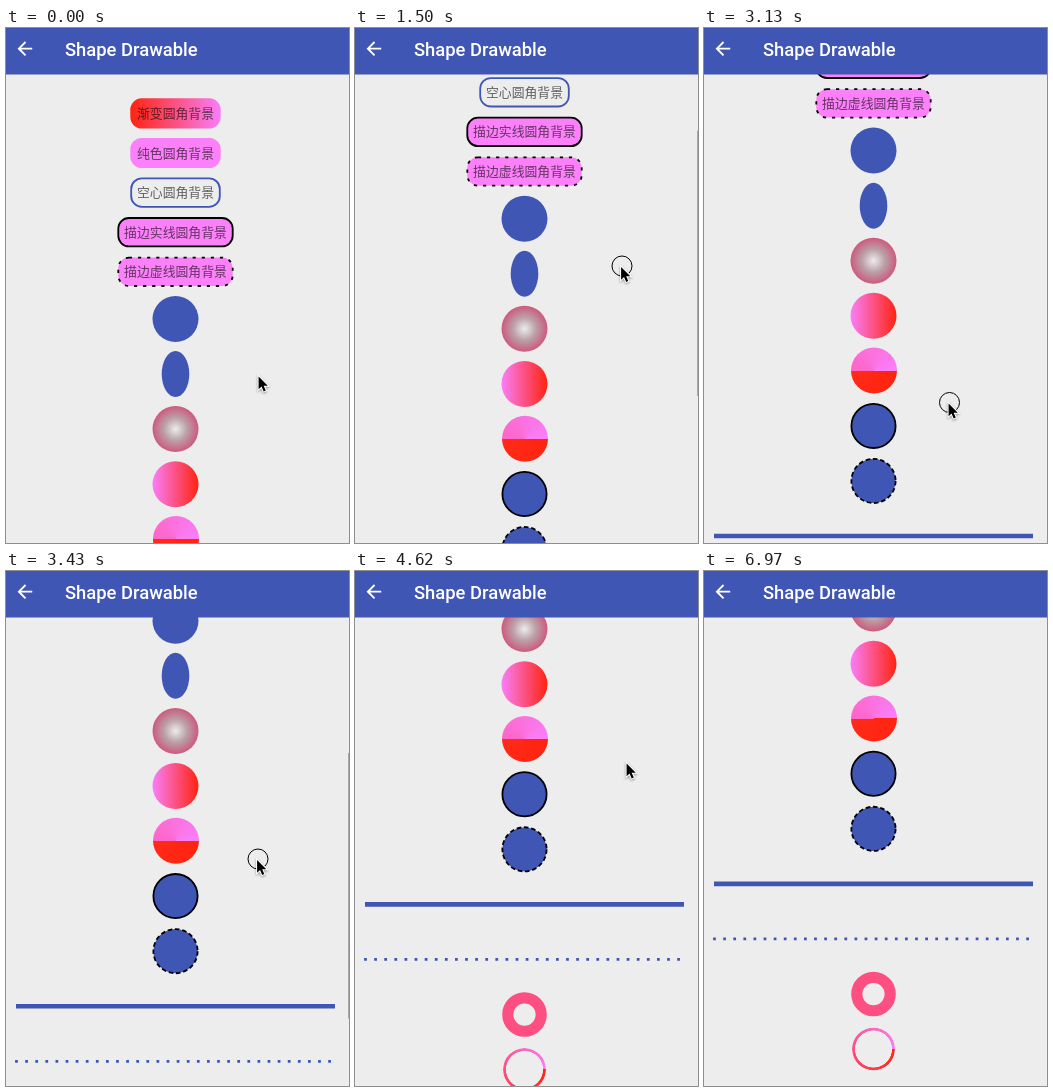
Write an HTML page that moves like this. It is 343 px wide and 515 px high and loops after 7.27 s.

```html
<!DOCTYPE html>
<html lang="zh">
<head>
<meta charset="utf-8">
<title>Shape Drawable</title>
<style>
html, body { margin: 0; width: 100%; height: 100%; overflow: hidden; background: #ededed; }
#stage { position: relative; width: 100%; height: 100%; overflow: hidden; contain: strict; }
#list, svg { position: absolute; left: 0; top: 0; }
.sweep { position: absolute; border-radius: 50%; }
#half {
  left: 146.5px; top: 488.2px; width: 46px; height: 46px;
  background: conic-gradient(from 90deg, #ff2410, #ff2a18 50%, #fd66c8 50%, #f97ef8);
}
#arc {
  left: 148px; top: 820.1px; width: 43px; height: 43px;
  background: conic-gradient(from 90deg, #ff2410, #fe4f83 50%, #f97ef8);
  -webkit-mask: radial-gradient(circle, transparent 18.2px, #000 18.8px);
  mask: radial-gradient(circle, transparent 18.2px, #000 18.8px);
}
.label { font: 12.85px "Noto Sans CJK SC", "Noto Sans CJK", sans-serif; fill: #000; fill-opacity: .6; text-anchor: middle; }
.title { font: 500 18.4px Roboto, sans-serif; fill: #fff; }
#arrow { stroke: #fff; stroke-width: 2.2; paint-order: stroke; filter: drop-shadow(0 1px 1px #0006); }
</style>
</head>
<body>
<div id="stage">
  <div id="list">
    <svg width="343" height="900">
      <defs>
        <linearGradient id="warm"><stop stop-color="#ff2410"/><stop offset="1" stop-color="#f97ef8"/></linearGradient>
        <linearGradient id="cool"><stop stop-color="#f97ef8"/><stop offset="1" stop-color="#ff2410"/></linearGradient>
        <radialGradient id="glow"><stop stop-color="#ececec"/><stop offset=".5" stop-color="#bba0a8"/><stop offset="1" stop-color="#cc5a7e"/></radialGradient>
      </defs>
      <g id="shapes"></g>
    </svg>
    <div id="half" class="sweep"></div>
    <div id="arc" class="sweep"></div>
  </div>
  <svg width="343" height="515">
    <rect id="bar" x="342" width="1" height="265.5" fill="#a9a9a9"/>
    <rect width="343" height="46.5" fill="#4056b4"/>
    <path transform="translate(7.9 9.7) scale(.917)" fill="#fff" d="M20 11H7.83l5.59-5.59L12 4l-8 8 8 8 1.41-1.41L7.83 13H20z"/>
    <text class="title" x="58.9" y="27.7">Shape Drawable</text>
    <g id="cursor">
      <circle id="ring" cx="1.5" cy=".5" r="10" fill="none" stroke="#000"/>
      <path id="arrow" transform="translate(.6 1.4) scale(.92)" d="M0 0V14l3.2-3 2.3 5.3 2.3-1-2.3-5.1H10z"/>
    </g>
  </svg>
</div>
<script>
const $ = id => document.getElementById(id);
const BLUE = '#4056b4', PINK = '#fb80f9', CX = 169.5;
const rowY = k => 291 + 55.06 * k;

function pill(row, text, fill, stroke = 'none', dash = '') {
  const inset = stroke === 'none' ? 0 : 0.9;
  const w = 13 + 12.9 * text.length - 2 * inset, h = 30.2 - 2 * inset, y = 85.4 + 39.6 * row;
  return `<rect x="${CX - w / 2}" y="${y - h / 2}" width="${w}" height="${h}" rx="${11.5 - inset}"
    fill="${fill}" stroke="${stroke}" stroke-width="1.8" stroke-dasharray="${dash}"/>
    <text class="label" x="${CX}" y="${y + 4.6}">${text}</text>`;
}
const oval = (k, fill, rx = 23, r = 23, extra = '') =>
  `<ellipse cx="${CX}" cy="${rowY(k)}" rx="${rx}" ry="${r}" fill="${fill}" ${extra}/>`;
const line = (k, x1, x2, w, dash = '') =>
  `<path d="M${x1} ${rowY(k)}H${x2}" stroke="${BLUE}" stroke-width="${w}" stroke-dasharray="${dash}"/>`;
const outline = 'stroke="#000" stroke-width="1.8"';

$('shapes').innerHTML = [
  pill(0, '渐变圆角背景', 'url(#warm)'),
  pill(1, '纯色圆角背景', PINK),
  pill(2, '空心圆角背景', 'none', BLUE),
  pill(3, '描边实线圆角背景', PINK, '#000'),
  pill(4, '描边虚线圆角背景', PINK, '#000', '3.2 5.9'),
  oval(0, BLUE),
  oval(1, BLUE, 13.8),
  oval(2, 'url(#glow)'),
  oval(3, 'url(#cool)'),
  oval(5, BLUE, 22.1, 22.1, outline),
  oval(6, BLUE, 22.1, 22.1, outline + ' stroke-dasharray="4.6 2.75"'),
  line(7, 10, 329, 4.6),
  line(8, 9.1, 326, 2.75, '2.75 7.35'),
  oval(9, 'none', 16.7, 16.7, 'stroke="#fe4f83" stroke-width="11.2"')
].join('');

// The screen refreshes 49 times per loop; poses are timed in these ticks.
const LOOP = 7270, TICK = LOOP / 49;
const pose = (tick, x, y, scroll) => ({ tick, x, y, scroll });
const END = 363.5;
const poses = [
  pose(5, 252, 347, 0),
  pose(8, 252, 304, 31.6),
  pose(12, 279, 171, 169),
  pose(18, 244, 374, 168.4),
  pose(21, 244, 374, 168.4),
  pose(25, 257, 201, 314),
  pose(27, 271, 191, 343),
  pose(34, 271, 191, 343),
  pose(36, 269, 137, END),
  pose(39, 279, 125, END),
  pose(41, 279, 125, END),
  pose(45, 337, 502, END)
];
const pressed = [[5, 13], [20, 29], [33, 41]];
const shown = [[0, 42], [45, 47]];

const clamp = v => Math.max(0, Math.min(1, v));
const within = (i, spans) => spans.some(([a, b]) => i >= a && i < b);

function poseAt(i) {
  const n = poses.findIndex(p => p.tick > i);
  if (n < 1) return n ? poses[poses.length - 1] : poses[0];
  const a = poses[n - 1], b = poses[n], p = (i - a.tick) / (b.tick - a.tick);
  const mix = key => a[key] + (b[key] - a[key]) * p;
  return pose(i, mix('x'), mix('y'), mix('scroll'));
}

// The scrollbar appears two ticks after a press and fades after release.
const barOpacity = i =>
  Math.max(...pressed.map(([a, b]) => i < a + 2 ? 0 : clamp(1 - (i - b) / 2)));

function draw(now) {
  const i = Math.floor((now % LOOP + 20) / TICK) % 49;
  const { x, y, scroll } = poseAt(i);
  $('list').style.transform = `translateY(${-scroll}px)`;
  $('bar').setAttribute('y', 46 + scroll * 0.5637);
  $('bar').setAttribute('opacity', barOpacity(i));
  $('cursor').setAttribute('transform', `translate(${x} ${y})`);
  $('cursor').setAttribute('visibility', within(i, shown) ? 'visible' : 'hidden');
  $('ring').setAttribute('opacity', within(i, pressed) ? 1 : 0);
}

const begin = performance.now();
function loop() {
  draw(performance.now() - begin);
  requestAnimationFrame(loop);
}
loop();
</script>
</body>
</html>
```
